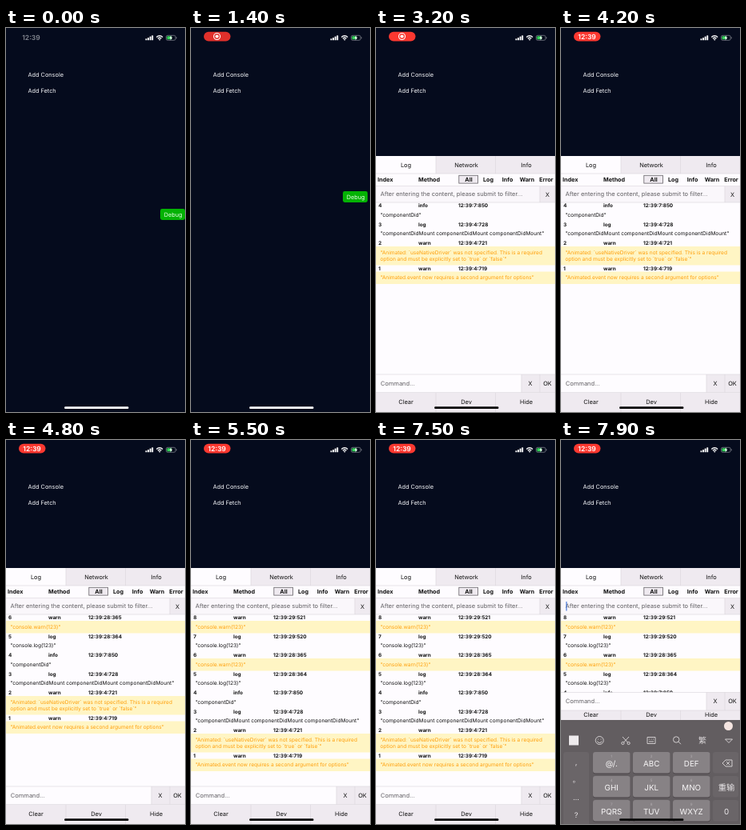
Recreate the animation shown at these times as an HTML page. Size 224 by 480 pixels, loop 8 s.

```html
<!DOCTYPE html>
<html lang="en">
<head>
<meta charset="utf-8">
<title>Debug panel</title>
<style>
  html, body { margin: 0; width: 100%; height: 100%; overflow: hidden; background: #050b1d; }
  svg { display: block; width: 224px; height: 480px; }
  text { font-family: Inter, "Noto Sans CJK SC", "Noto Sans CJK", sans-serif; text-rendering: geometricPrecision; white-space: pre; }

  .anim { animation: 8s step-end infinite; }
  #clock { animation-name: clock; }
  #pill { animation-name: pill; }
  #rec { animation-name: rec; }
  #pillTime { animation-name: pillTime; }
  #debug { animation-name: drag; }
  #panel { animation-name: open; }
  #rows { animation-name: rows; }
  #command { animation-name: command; }
  #footer { animation-name: footer; }
  #keyboard { animation-name: keyboard; }
  #caret { animation-name: caret; }
  #home { animation-name: home; }

  @keyframes clock { 0% { opacity: 1 } 1.25% { opacity: .4 } 2.5%, 100% { opacity: 0 } }
  @keyframes pill {
    0% { opacity: 0; fill: #e0302b }
    1.25% { opacity: .5; fill: #e0302b }
    2.5% { opacity: 1; fill: #e0302b }
    25%, 100% { opacity: 1; fill: #fb3830 }
  }
  @keyframes rec { 0% { opacity: 0 } 2.5% { opacity: 1 } 42.5%, 100% { opacity: 0 } }
  @keyframes pillTime { 0% { opacity: 0 } 42.5%, 100% { opacity: 1 } }
  @keyframes drag {
    0% { transform: none }
    5% { transform: none; animation-timing-function: steps(8) }
    15%, 100% { transform: translate(-3px, -22px) }
  }
  @keyframes open { 0% { visibility: hidden } 25%, 100% { visibility: visible } }
  @keyframes rows {
    0% { transform: translateY(-94px) }
    53.75% { transform: translateY(-47px) }
    68.75%, 100% { transform: none }
  }
  @keyframes command { 0% { transform: none } 97.5% { transform: translateY(-9px) } 98.75%, 100% { transform: translateY(-117.5px) } }
  @keyframes footer { 0% { transform: none } 97.5% { transform: translateY(-9.5px) } 98.75%, 100% { transform: translateY(-124px) } }
  @keyframes keyboard { 0% { transform: translateY(142px) } 97.5% { transform: translateY(120px) } 98.75%, 100% { transform: none } }
  @keyframes caret { 0% { opacity: 0 } 97.5%, 100% { opacity: 1 } }
  @keyframes home { 0% { fill: #fff } 25% { fill: #aaa } 26.25% { fill: #777 } 27.5% { fill: #444 } 28.75%, 100% { fill: #080808 } }
</style>
</head>
<body>
<svg id="stage" viewBox="0 0 224 480"></svg>
<script>
// x is the left edge, or the centre when mid is set; y is the vertical centre
const text = (x, y, s, { size = 7.4, fill = '#111', weight = 400, mid = false } = {}) =>
  `<text x="${x}" y="${y + size * 0.36}" font-size="${size}" fill="${fill}" font-weight="${weight}"` +
  `${mid ? ' text-anchor="middle"' : ''}>${s}</text>`;
const centre = (x, y, s, opts = {}) => text(x, y, s, { ...opts, mid: true });
const box = (x, y, w, h, fill, extra = '') =>
  `<rect x="${x}" y="${y}" width="${w}" height="${h}" fill="${fill}" ${extra}/>`;
const line = (d, stroke = '#d8d3da', width = 0.6) =>
  `<path d="${d}" fill="none" stroke="${stroke}" stroke-width="${width}"/>`;
const part = (id, body) => `<g id="${id}" class="anim">${body}</g>`;

const GREY = '#efeaf0', PAPER = '#fefcff', HINT = '#626064';

function statusBar() {
  const bars = [2, 3.3, 4.7, 6].map((h, i) => box(174.5 + i * 2.6, 15.3 - h, 1.9, h, '#fff', 'rx=".4"')).join('');
  const wifi = line('M188.3 11.4a5.6 5.6 0 0 1 7.8 0M190 13.2a3.2 3.2 0 0 1 4.4 0', '#fff', 1.4) +
    '<path d="M192.2 15.7l-1.3-1.4a1.9 1.9 0 0 1 2.6 0z" fill="#fff"/>';
  const battery = box(200.5, 9.3, 11.6, 6, 'none', 'rx="1.7" stroke="#8b8f97" stroke-width=".7"') +
    box(201.5, 10.3, 5.8, 4, '#32d158', 'rx=".9"') + box(212.8, 11.3, 0.8, 2, '#8b8f97', 'rx=".4"') +
    '<path d="M207.2 9.2l-2.8 3.5h1.8l-.7 2.8 2.9-3.7h-1.9z" fill="#fff"/>';
  const time = (fill) => centre(32, 0, '12:39', { size: 8.5, weight: 600, fill });
  return bars + wifi + battery +
    part('clock', `<g transform="translate(-.5 12.3)">${time('#858992')}</g>`) +
    '<rect id="pill" class="anim" x="16" y="4.7" width="33.5" height="11.8" rx="5.9"/>' +
    part('rec', '<circle cx="32.5" cy="10.5" r="4" fill="none" stroke="#fff" stroke-width="1.1"/><circle cx="32.5" cy="10.5" r="2.1" fill="#fff"/>') +
    part('pillTime', `<g transform="translate(.6 10.6)">${time('#fff')}</g>`);
}

function logRows() {
  const logs = [
    [8, 'warn', '29:521', 'console.warn(123)'],
    [7, 'log', '29:520', 'console.log(123)'],
    [6, 'warn', '28:365', 'console.warn(123)'],
    [5, 'log', '28:364', 'console.log(123)'],
    [4, 'info', '7:850', 'componentDid'],
    [3, 'log', '4:728', 'componentDidMount componentDidMount componentDidMount'],
    [2, 'warn', '4:721', 'Animated: `useNativeDriver` was not specified. This is a required\noption and must be explicitly set to `true` or `false`'],
    [1, 'warn', '4:719', 'Animated.event now requires a second argument for options'],
  ];
  let y = 218, out = '';
  for (const [index, method, time, message] of logs) {
    const lines = `"${message}"`.split('\n');
    const height = 7.5 + lines.length * 8;
    const warn = method === 'warn';
    const bold = { size: 6.35, weight: 700 };
    out += text(3, y + 4, index, bold) + text(53, y + 4, method, bold) + text(103, y + 4, '12:39:' + time, bold);
    if (warn) out += box(0, y + 8, 224, height, '#fff5c4');
    lines.forEach((s, i) => {
      out += text(5.3, y + 15.6 + i * 8, s, { size: 6.55, fill: warn ? '#ff9f0a' : '#111' });
    });
    y += 8 + height;
  }
  return out;
}

function panel() {
  const thirds = [37.5, 113, 188];
  const labels = (names, y) => names.map((s, i) => centre(thirds[i], y, s)).join('');
  const bold = { size: 7.2, weight: 700 };
  const filters = [[116, 'All'], [140.5, 'Log'], [164.5, 'Info'], [189, 'Warn'], [213, 'Error']];

  const list = `<g clip-path="url(#listClip)">${part('rows', logRows())}</g>`;
  const tabs = box(0, 160, 224, 22, GREY) + box(0, 160, 75, 22, PAPER) +
    line('M75 160v22M149.5 160v22M0 182h224') + labels(['Log', 'Network', 'Info'], 171);
  const head = text(2, 189, 'Index', bold) + text(53, 189, 'Method', bold) +
    box(103.8, 184.3, 23.7, 9.8, GREY, 'stroke="#666368" stroke-width=".8"') +
    filters.map(([x, s]) => centre(x, 189, s, bold)).join('') + line('M0 197.5h224');
  const search = box(0, 198, 205, 20, '#faf7fb') + box(205, 198, 19, 20, GREY) + line('M205 198v20M0 218h224') +
    text(5.5, 207.7, 'After entering the content, please submit to filter...', { size: 7.5, fill: HINT }) +
    centre(214.5, 208, 'X') + part('caret', box(6.3, 202, 1.1, 11.5, '#3b6fd8'));
  const footer = box(0, 456, 224, 30, GREY) + line('M75 456v30M149.5 456v30') + labels(['Clear', 'Dev', 'Hide'], 467);
  const command = box(0, 433, 182, 22.5, PAPER) + box(182, 433, 42, 22.5, GREY) +
    line('M0 433h224M0 455.5h224M182 433v22.5M205 433v22.5') +
    text(5.8, 444, 'Command...', { size: 7.5, fill: HINT }) + centre(193, 444, 'X') + centre(214.5, 444, 'OK');

  return box(0, 160, 224, 320, PAPER) + list + tabs + head + search + part('footer', footer) + part('command', command);
}

function keyboard() {
  const ink = '#ece9eb', side = '#6a6568';
  const key = (x, y, w, h, fill) => box(x, y, w, h, fill, 'rx="3"');
  const letters = ['@/.', 'ABC', 'DEF', 'GHI', 'JKL', 'MNO', 'PQRS', 'TUV', 'WXYZ'];
  let out = box(0, 350, 224, 140, '#625d60') + key(3, 390, 32, 100, side);
  letters.forEach((s, i) => {
    const x = 40 + (i % 3) * 50, y = 390 + Math.floor(i / 3) * 30;
    out += key(x, y + 1, 46.5, 26.5, '#4a4548') + key(x, y, 46.5, 26.5, '#878285') +
      centre(x + 23.2, y + 5, i + 1, { size: 4.5, fill: '#b3aeb1' }) +
      centre(x + 23.2, y + 14.2, s, { size: 9.8, fill: '#f8f6f7' });
  });
  for (const y of [390, 420, 450]) out += key(190, y, 32, 26.5, side);
  out += centre(207, 434, '重输', { size: 10.3, fill: ink }) + centre(207, 464, '0', { size: 9.8, fill: ink });
  [[403, ','], [425, '。'], [447, '…'], [469, '?']].forEach(([y, s]) => {
    out += centre(19, y, s, { size: 9, fill: ink });
  });
  const icons =
    'M202 404l4-4h8v8h-8zM207 402l4 4M211 402l-4 4' +
    'M43.2 375.5a5 5 0 1 0 10 0a5 5 0 1 0-10 0M45.5 376.5a2.8 2.8 0 0 0 5.4 0M46.4 373.6v.9M50 373.6v.9' +
    'M77 371l6.5 7M85 371l-6.5 7M75.8 379a1.6 1.6 0 1 0 3.2 0a1.6 1.6 0 1 0-3.2 0M83 379a1.6 1.6 0 1 0 3.2 0a1.6 1.6 0 1 0-3.2 0' +
    'M108 371.5h10v8h-10zM110 374h1M112.5 374h1M115 374h1M110 377h6' +
    'M140.5 374.5a3.7 3.7 0 1 0 7.4 0a3.7 3.7 0 1 0-7.4 0M147 377.2l3 3' +
    'M205.5 374h9l-4.5 4.5z';
  return out + line(icons, '#dcd8da', 0.9) + centre(177, 375.5, '繁', { size: 10, fill: '#dcd8da' }) +
    box(10, 369.5, 12, 12, '#eeebed') + '<circle cx="209.5" cy="357.5" r="5.5" fill="#f4e4e0"/>';
}

const white = { size: 7.35, fill: '#f4f5f8' };
document.getElementById('stage').innerHTML =
  '<clipPath id="listClip"><rect y="218" width="224" height="215"/></clipPath>' +
  box(0, 0, 224, 480, '#050b1d') + statusBar() +
  text(27.4, 58.5, 'Add Console', white) + text(27.4, 78, 'Add Fetch', white) +
  part('debug', box(193, 226, 31, 14, '#04b204', 'rx="2.4"') + centre(209.2, 233, 'Debug', { size: 7.3, fill: '#e9ffe9' })) +
  part('panel', panel()) + part('keyboard', keyboard()) +
  '<rect id="home" class="anim" x="73" y="473.2" width="80.5" height="2.9" rx="1.45"/>';
</script>
</body>
</html>
```
